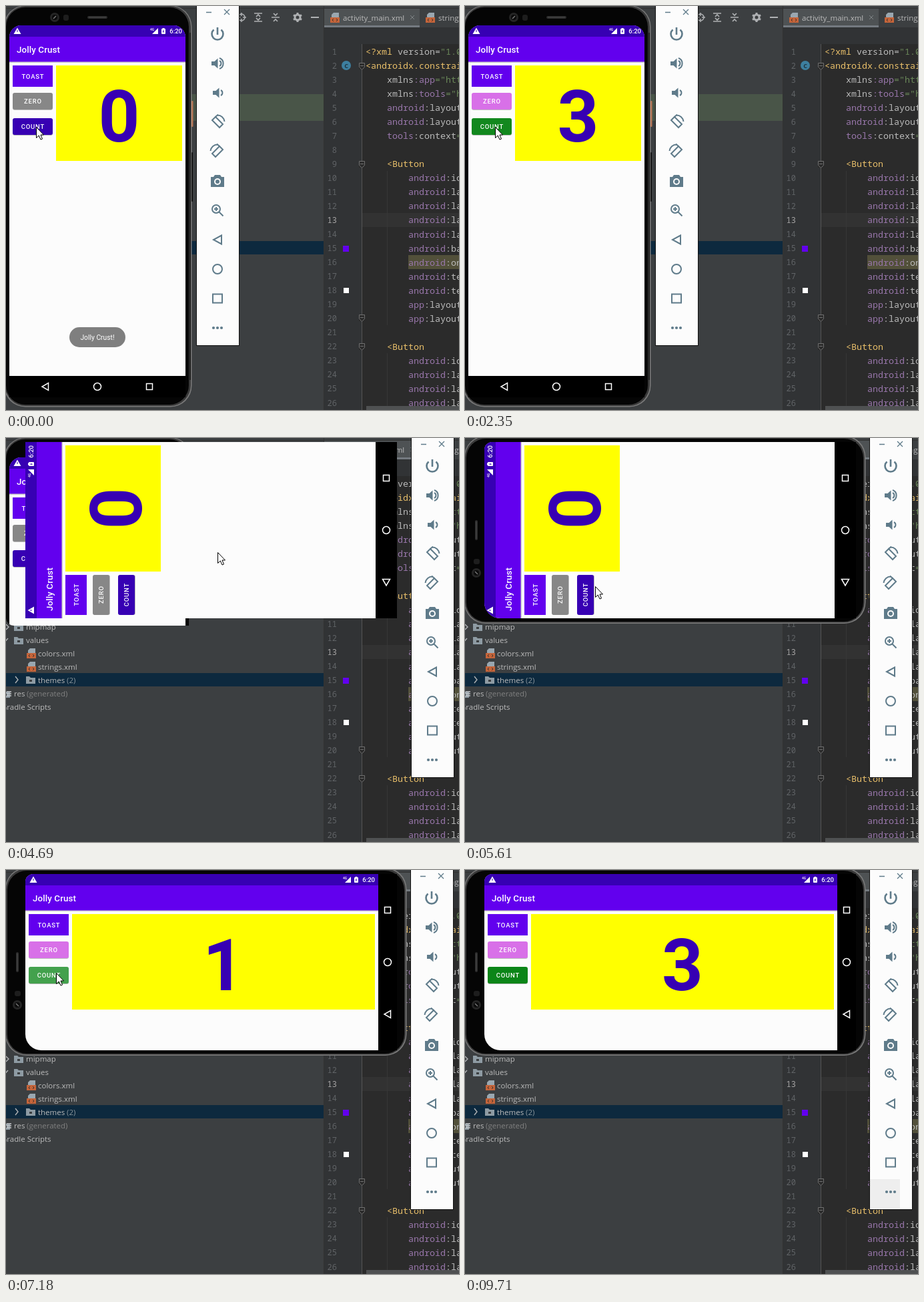
Write an HTML page with a canvas that moves like this. It is 679x605 px and loops after 10 s.

```html
<!DOCTYPE html>
<html lang="en">
<head>
<meta charset="utf-8">
<style>
  html, body { margin: 0; width: 679px; height: 605px; overflow: hidden; background: #3c3f41; }
  canvas { display: block; }
</style>
</head>
<body>
<canvas id="stage" width="679" height="605"></canvas>
<script>
const stage = document.getElementById('stage').getContext('2d');
const snapshot = Object.assign(document.createElement('canvas'), { width: 264, height: 557 });
let ctx = stage;

const LOOP = 10000;
const APP = 'Jolly Crust';
const UI = '11.5px "Open Sans", "Noto Sans", sans-serif';
const MONO = '"Noto Sans Mono", "DejaVu Sans Mono", monospace';
const ROBOTO = 'Roboto, sans-serif';
const PURPLE = '#6200ee', DEEP = '#3700b3', SLATE = '#5f7b8a';

// Bursts of picture changes: first, last, number of steps
const BURSTS = [
  [0, 0, 1], [150, 1050, 8], [1200, 1560, 4], [1980, 2350, 4], [2780, 3020, 3],
  [3290, 3980, 6], [4540, 5480, 7], [5610, 5610, 1], [6160, 6730, 5],
  [7030, 8050, 8], [8200, 8990, 7], [9260, 9380, 2], [9710, 9710, 1]
];
// Taps: time, new count
const TAPS = [[300, 1], [760, 2], [1980, 3], [2780, 0], [7030, 1], [7600, 2], [8200, 3]];
// Pointer tip: time, x, y
const POINTER = [
  [0, 45, 181], [2400, 45, 181], [2780, 43, 149], [3200, 43, 149], [3660, 381, 205],
  [3980, 317, 171], [4690, 317, 171], [5480, 195, 218], [5610, 195, 222], [6160, 195, 222],
  [6730, 75, 154], [8450, 75, 154], [8990, 491, 463], [9260, 630, 482], [9380, 649, 580]
];

const clamp = v => Math.max(0, Math.min(1, v));

function rect(color, x, y, w, h, r = 0) {
  ctx.fillStyle = color;
  ctx.beginPath();
  ctx.roundRect(x, y, w, h, r);
  ctx.fill();
}
function text(str, x, y, font, color, align = 'left', spacing = 0) {
  ctx.font = font;
  ctx.fillStyle = color;
  ctx.textAlign = align;
  ctx.letterSpacing = spacing + 'px';
  ctx.fillText(str, x, y);
}
function at(x, y, draw, angle = 0) {
  ctx.save();
  ctx.translate(x, y);
  ctx.rotate(angle);
  draw();
  ctx.restore();
}
function clipped(x, y, w, h, r, draw) {
  ctx.save();
  ctx.beginPath();
  ctx.roundRect(x, y, w, h, r);
  ctx.clip();
  draw();
  ctx.restore();
}
function stroke(d, color, width = 1) {
  ctx.strokeStyle = color;
  ctx.lineWidth = width;
  ctx.stroke(new Path2D(d));
}
function fill(d, color) {
  ctx.fillStyle = color;
  ctx.fill(new Path2D(d));
}
function dot(x, y, r, color) {
  ctx.fillStyle = color;
  ctx.beginPath();
  ctx.arc(x, y, r, 0, 7);
  ctx.fill();
}

// The picture holds still between steps, which fall on whole hundredths of a second
function heldTime(t) {
  const [a, b, n] = BURSTS.filter(s => s[0] <= t).pop();
  if (t >= b) return b;
  const step = Math.floor((b - a) / (n - 1) / 10) * 10;
  return a + Math.min(n - 2, Math.floor((t - a) / step)) * step;
}

// --- IDE ---
function xmlIcon(x, y) {
  fill(`M${x + 5} ${y - 7}h8v7h-11v-4z`, '#9aa7b0');
  rect('#c4643a', x, y, 14, 8);
  stroke(`M${x + 5} ${y + 2}l-2 2 2 2M${x + 9} ${y + 2}l2 2-2 2`, '#3c3028');
}
function folder(x, y) {
  fill(`M${x} ${y - 5}h5l2 2h7v9h-14z`, '#8e9ba3');
  rect('#3c3f41', x + 5, y, 4, 3);
}
function tree() {
  const label = (s, x, y, c = '#bbbbbb') => text(s, x, y + 4, UI, c);
  rect('#3c3f41', 0, 0, 476, 605);
  rect('#495548', 0, 132, 476, 40);
  rect('#0d293e', 0, 352, 476, 20);
  at(353, 17, () => stroke('M5 0A5 5 0 1 1-5 0 5 5 0 1 1 5 0M0-7v5M0 2v5M-7 0h5M2 0h5', '#afb1b3', 1.5));
  at(378, 17, () => stroke('M-6-6h12M-6 6h12M-3-1l3-3 3 3M-3 1l3 3 3-3', '#afb1b3', 1.7));
  at(404, 17, () => stroke('M-6 0h12M-3-6l3 3 3-3M-3 6l3-3 3 3', '#afb1b3', 1.7));
  at(437, 17, () => {
    stroke('M4 0A4 4 0 1 1-4 0 4 4 0 1 1 4 0', '#afb1b3', 3);
    for (let i = 0; i < 6; i++) { ctx.rotate(Math.PI / 3); rect('#afb1b3', -1.5, 4, 3, 3); }
  });
  rect('#afb1b3', 457, 16, 12, 2);

  stroke('M0 279l4 4-4 4M-4 300l3.500 4 3.500-4M14 357l4 5-4 5', '#afb1b3', 1.4);
  folder(12, 283); label('mipmap', 30, 283);
  folder(12, 303); label('values', 30, 303);
  xmlIcon(31, 322); label('colors.xml', 48, 323);
  xmlIcon(31, 342); label('strings.xml', 48, 343);
  folder(30, 362); label('themes', 48, 363); label('(2)', 91, 363, '#87939a');
  folder(-8, 383); stroke('M1 380h7M1 383h7M1 386h7', '#c9cdd0', 1.5);
  label('res', 12, 383); label('(generated)', 31, 383, '#808080');
  label('Gradle Scripts', -7, 403);
}

function codeLine(n) {
  const tag = '#e8bf6a', ns = '#9876aa', attr = '#bababa', str = '#6a8759';
  const a = s => [['android', ns], [':' + s, attr]];
  const app = [['app', ns], [':layout_constraint', attr]];
  const id = a('id="@+id'), lay = a('layout_width'), btn = [['<Button', tag]];
  return {
    1: [0, ['<?xml ', tag], ['version=', attr], ['"1.0" enc', str]],
    2: [0, ['<androidx.constraintlayout', tag]],
    3: [4, ['xmlns', attr], [':app', ns], ['="http://', str]],
    4: [4, ['xmlns', attr], [':tools', ns], ['="http://', str]],
    5: [4, ...lay], 6: [4, ...lay],
    7: [4, ['tools', ns], [':context', attr], ['="', str]],
    9: [4, ...btn], 10: [8, ...id], 11: [8, ...lay], 12: [8, ...lay], 13: [8, ...lay], 14: [8, ...lay],
    15: [8, ...a('background')], 16: [8, ...a('onClick')], 17: [8, ...a('text')], 18: [8, ...a('textColor')],
    19: [8, ...app], 20: [8, ...app],
    22: [4, ...btn], 23: [8, ...id], 24: [8, ...lay], 25: [8, ...lay], 26: [8, ...lay]
  }[n];
}
function editor() {
  rect('#2b2b2b', 534, 32, 145, 573);
  rect('#313335', 476, 32, 58, 573);
  rect('#313335', 476, 32, 203, 25);
  rect('#3c3f41', 476, 0, 203, 32);
  rect('#4e5254', 477, 4, 143, 28);
  rect('#747a80', 477, 29, 143, 3);
  rect('#323232', 0, 3, 679, 1);
  rect('#323232', 476, 0, 1, 605);
  xmlIcon(486, 17);
  text('activity_main.xml', 505, 22, UI, '#bbbbbb');
  stroke('M606 14l6 6M612 14l-6 6', '#7f8486');
  xmlIcon(629, 17);
  text('strings.xml', 648, 22, UI, '#bbbbbb');

  rect('#323232', 534, 310, 145, 21);
  rect('#52503a', 603, 373, 76, 21);
  rect('#555555', 533, 57, 1, 548);
  stroke('M571.500 247V478M571.500 520V605', '#373737');
  for (let n = 1; n <= 26; n++) {
    const y = 68 + (n - 1) * 21.04;
    text(n, 496, y + 4.5, '12px ' + MONO, n === 13 ? '#a4a3a3' : '#606366', 'right');
    const line = codeLine(n);
    if (!line) continue;
    let x = 539 + line[0] * 8;
    for (const [s, color] of line.slice(1)) {
      text(s, x, y + 5, '13.33px ' + MONO, color);
      x += s.length * 8;
    }
  }
  for (const y of [90, 237, 467, 510]) {
    rect('#2b2b2b', 529, y - 5, 9, 10);
    stroke(`M529.500 ${y - 4.5}h8v6l-4 4-4-4zM531 ${y - .5}h5`, '#707070');
  }
  dot(510, 89, 7, '#3d7f9f');
  text('C', 510, 93, 'bold 9px "Open Sans", sans-serif', '#1f3440', 'center');
  rect(PURPLE, 505, 359, 9, 9);
  rect('#ffffff', 506, 422, 8, 8);
  rect('#4f5152', 540, 599, 139, 6);
}

// --- Phone ---
function button(label, y, h, color, r, glow = 0) {
  if (r) rect('rgba(0,0,0,.25)', 5, y + 1, 60, h, r);
  rect(color, 5, y, 60, h, r);
  if (glow > 0) rect(`rgba(255,255,255,${glow})`, 5, y, 60, h, r);
  text(label, 35.4, y + h / 2 + 3.5, '500 9.5px ' + ROBOTO, '#ffffff', 'center', .8);
}
// App contents with the origin in the top left corner
function screen(w, h, app) {
  rect('#fcfcfc', 0, 0, w, h);
  rect('rgba(0,0,0,.18)', 0, 54, w, 2);
  rect(PURPLE, 0, 0, w, 54.5);
  rect(DEEP, 0, 0, w, 17);
  fill('M12 3.500l5.500 9.500h-11z', '#ffffff');
  rect(DEEP, 11.5, 7, 1, 3);
  text('4G', w - 53, 8, '500 5px ' + ROBOTO, '#ffffff');
  fill(`M${w - 41} 4v9h-9z`, '#ffffff');
  rect('#ffffff', w - 36, 5, 6, 8, 1);
  rect('#ffffff', w - 34.5, 4, 3, 1);
  fill(`M${w - 32.5} 6l-2 3.500h1.200l-.5 2.500 2-3.500h-1.200z`, DEEP);
  text('6:20', w - 5, 12.3, '500 9.5px ' + ROBOTO, '#ffffff', 'right');
  text(APP, 11, 41, '500 13.4px ' + ROBOTO, '#ffffff', 'left', .1);

  button('TOAST', 60, 32, PURPLE, 0);
  button('ZERO', 101, 25, app.count ? '#d870e8' : '#878787', 3, app.count ? 0 : app.glow);
  button('COUNT', 139, 25, app.count ? '#0b8518' : DEEP, 3, app.count ? app.glow : 0);
  rect('#ffff00', 70, 60, w - 75, 143);
  text(app.count, (w + 65) / 2, 173.5, 'bold 108px ' + ROBOTO, DEEP, 'center');
}
function navIcons(x, y, dx, dy) {
  ['M4.500-5.500v11L-5 0z', 'M5.500 0A5.500 5.500 0 1 1-5.500 0 5.500 5.500 0 1 1 5.500 0', 'M-4.500-4.500h9v9h-9z']
    .forEach((d, i) => at(x + dx * i, y + dy * i, () => stroke(d, '#ffffff', 1.5)));
}
function upright(app) {
  screen(264, 525, app);
  rect('#000000', 0, 525, 264, 32);
  navIcons(54, 541, 78, 0);
}
const sideways = app => at(29, 270, () => upright(app), -Math.PI / 2);

function body() {
  rect('#7a7a7a', -3, -1, 281.5, 601.5, 32);
  rect('#3a3a3a', -1.5, 0, 278.5, 599, 31);
  rect('#050505', 0, 2, 274, 595, 29);
  stroke('M276 40V560', '#1b1b1b', 2);
  rect('#b8795a', 278, 142, 2.5, 39, 1);
  rect('#151515', 278, 219, 2, 74, 1);
  dot(73, 17, 7, '#252525');
  dot(73, 17, 4, '#0b0b0b');
  stroke('M71 19l4-4', '#777777', 1.5);
  rect('#1d1d1d', 86, 13, 8, 9, 3);
  rect('#2c2c2c', 122, 15, 30, 4, 2);
  stroke('M124 17h26', '#4a4a4a');
}
function portrait(app) {
  body();
  clipped(5, 29, 264, 557, [18, 18, 0, 0], () => at(5, 29, () => upright(app)));
}

// The wide layout swings into place below a stretched, fading snapshot of the upright one
function turning(t, app) {
  const left = 1 - clamp((t - 6160) / 570);
  const angle = -16 * left * left * Math.PI / 180;
  rect('#000000', 29, 6, 557, 264);
  at(307.5, 138, () => {
    at(-278.5, -132, () => screen(529, 264, app));
    if (left === 0) return;
    ctx = snapshot.getContext('2d');
    upright(app);
    ctx = stage;
    ctx.globalAlpha = .2 * left;
    ctx.scale(1.9, .567);
    ctx.drawImage(snapshot, -132, -278.5);
  }, angle);
  if (left === 0) navIcons(572, 216, 0, -78);
}
function landscape(t, app) {
  at(0, 275, body, -Math.PI / 2);
  clipped(29, 6, 557, 264, [12, 0, 0, 24], () => t < 6160 ? sideways(app) : turning(t, app));
}
function toast(alpha) {
  ctx.globalAlpha = alpha;
  rect('#7f7f7f', 95, 481, 84, 30, 15);
  text(APP + '!', 137, 500, '10.3px ' + ROBOTO, '#ffffff', 'center');
  ctx.globalAlpha = 1;
}

// --- Emulator toolbar ---
const speaker = 'h4.500l5-4.500v15l-5-4.500h-4.500z';
function rotateIcon() {
  stroke('M-3-8L8 3 3 8-8-3z', SLATE, 2);
  stroke('M0-10.500A10.500 10.500 0 0 1 10.500-1M-3-8L1-11.500', SLATE, 2);
}
const TOOLS = [
  () => stroke('M0-10V1M-5.500-6.500A8.500 8.500 0 1 0 5.500-6.500', SLATE, 2.6),
  () => { fill('M-9-3' + speaker, SLATE); stroke('M3-4a4.500 4.500 0 0 1 0 8M3-8a8.500 8.500 0 0 1 0 16', SLATE, 2); },
  () => { fill('M-7-3' + speaker, SLATE); stroke('M5-4a4.500 4.500 0 0 1 0 8', SLATE, 2); },
  rotateIcon,
  () => { ctx.scale(-1, 1); rotateIcon(); },
  () => { fill('M-10-6h4l2-3h8l2 3h4v15h-20z', SLATE); dot(0, 1, 5, '#fcfcfc'); dot(0, 1, 3, SLATE); },
  () => stroke('M4-2A6 6 0 1 1-8-2 6 6 0 1 1 4-2M2.500 2.500l6 6M-5-2h6M-2-5v6', SLATE, 2),
  () => stroke('M6-6.500v13L-6 0z', SLATE, 2),
  () => stroke('M7 0A7 7 0 1 1-7 0 7 7 0 1 1 7 0', SLATE, 2),
  () => stroke('M-7-6.500h14v13h-14z', SLATE, 2),
  () => [-6, 0, 6].forEach(x => dot(x, 0, 2.1, SLATE))
];
function toolbar(x, t) {
  rect('#111111', x - 1, 0, 65, 509);
  rect('#fcfcfc', x, 0, 63, 508);
  if (t >= 3980 && t < 4540) rect('#eeeeee', x, 174, 63, 66);
  if (t >= 9260) rect('#eeeeee', x, 463, 45, 44);
  stroke(`M${x + 14} 9.500h8M${x + 41} 5l8 8M${x + 49} 5l-8 8`, SLATE, 1.3);
  TOOLS.forEach((draw, i) => at(x + 31, 42 + 44 * i, draw));
}

function pointer(t) {
  if (t >= 9710) return;
  const i = POINTER.findLastIndex(k => k[0] <= t);
  const [t0, x0, y0] = POINTER[i], [t1, x1, y1] = POINTER[i + 1] || [t0 + 1, x0, y0];
  const p = clamp((t - t0) / (t1 - t0));
  at(x0 + (x1 - x0) * p, y0 + (y1 - y0) * p, () => {
    const arrow = 'M.5.5V16.500L4.300 13 7 19 9.500 18 7 12H11.500z';
    fill(arrow, '#ffffff');
    stroke(arrow, '#000000');
  });
}

function frame() {
  const t = heldTime(performance.now() % LOOP);
  const [tapped, count] = TAPS.filter(k => k[0] <= t).pop() || [-1000, 0];
  const app = { count, glow: .35 * (1 - (t - tapped) / 400) };

  tree();
  editor();
  if (t < 4540) {
    portrait(app);
    const alpha = clamp(1 - (t - 800) / 500);
    if (alpha > 0) toast(alpha);
  } else if (t < 4840) {
    clipped(0, 0, 275, 281, [0, 0, 0, 12], () => portrait(app));
    if (t >= 4690) sideways(app);
  } else {
    landscape(t, app);
  }
  toolbar(t < 4540 ? 286 : t < 4840 ? 608 : 607, t);
  pointer(t);
  requestAnimationFrame(frame);
}
frame();
</script>
</body>
</html>
```
